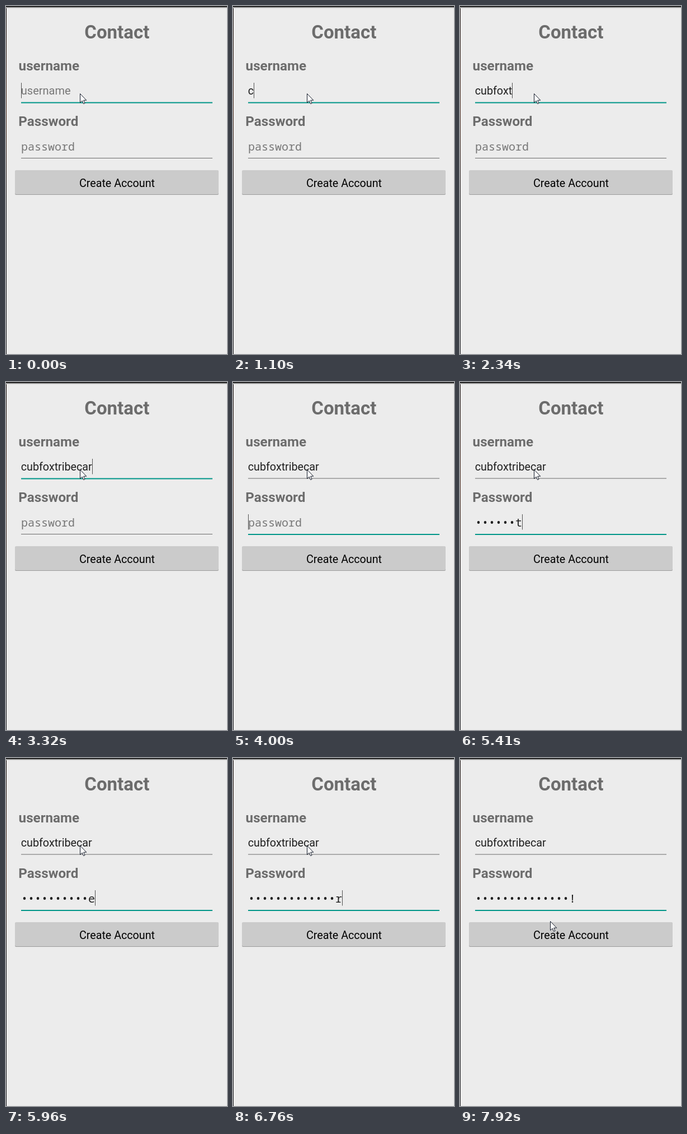
These frames come from a looping animation (395 px wide and 621 px high, 8000 ms). An HTML page:

```html
<!DOCTYPE html>
<html lang="en">
<head>
<meta charset="utf-8">
<title>Contact form</title>
<style>
html, body { margin: 0; width: 100%; height: 100%; overflow: hidden; background: #ececec; }
svg { display: block; width: 395px; height: 621px; font: 19.7px Roboto, sans-serif; }
.head { font-size: 33px; font-weight: 700; fill: #6c6c6c; }
.label { font-size: 24.2px; }
.value { fill: #1f1f1f; }
.secret { font: 20px "Noto Sans Mono", monospace; }
.hint { fill: #777; }
#user.hint { font-size: 20px; }
</style>
</head>
<body>
<svg viewBox="0 0 395 621">
  <defs>
    <linearGradient id="edge" x2="0" y2="1">
      <stop offset="0" stop-color="#140d0c"/>
      <stop offset=".3" stop-color="#4a2a1c"/>
      <stop offset=".58" stop-color="#17171a"/>
    </linearGradient>
    <linearGradient id="shade" x2="0" y2="1">
      <stop offset="0" stop-color="#333"/>
      <stop offset="1" stop-color="#ececec"/>
    </linearGradient>
  </defs>
  <rect width="395" height="621" fill="#ececec"/>
  <rect width="1" height="621" fill="url(#edge)"/>
  <rect width="395" height="1" fill="#000"/>
  <rect y="1" width="395" height="3" fill="url(#shade)"/>

  <text class="head" x="198.3" y="58" text-anchor="middle">Contact</text>
  <text class="head label" x="22.6" y="115">username</text>
  <text class="head label" x="22.3" y="214">Password</text>

  <rect id="userLine" x="27" y="171.5" width="342"/>
  <text id="user" x="26.8" y="158"></text>
  <rect id="passLine" x="27" y="271" width="342"/>
  <text id="pass" x="27" y="258"></text>
  <rect id="caret" width="1" height="27.5" fill="#1f1f1f" fill-opacity=".75"/>

  <rect x="16" y="294" width="364" height="43" rx="2" fill="#9c9c9c"/>
  <rect x="16" y="293" width="364" height="43" rx="2" fill="#cbcbcb"/>
  <text x="198.5" y="323" text-anchor="middle">Create Account</text>

  <path id="pointer" d="M0 0V16L3.7 12.6 6.1 18 8.5 17 6.2 11.7H11.2Z" fill="#fff" stroke="#111827"/>
</svg>
<script>
const LOOP = 8000;
const BLINK = 560;
const FOCUS = 3880;

const el = id => document.getElementById(id);
const clamp = v => Math.max(0, Math.min(1, v));
const mix = (a, b, k) => a + (b - a) * k;

function set(node, attrs) {
  for (const key in attrs) node.setAttribute(key, attrs[key]);
}

// Each burst types its keys evenly from the first moment to the last.
function plan(bursts) {
  return bursts.flatMap(([keys, from, to = from]) =>
    [...keys].map((key, i) => ({ key, at: mix(from, to, i / Math.max(1, keys.length - 1)) })));
}

const user = {
  text: el('user'), line: el('userLine'), caretY: 137, hint: 'username', style: '', wake: -420,
  keys: plan([['c', 1100], ['ub', 1400], ['fox', 1830, 2070], ['t', 2340],
    ['ribe', 2620, 2770], ['car', 3170, 3320]]),
  show: s => s
};
const pass = {
  text: el('pass'), line: el('passLine'), caretY: 236, hint: 'password', style: 'secret', wake: 4000,
  keys: plan([['cubfoxt', 4560, 5410], ['ribe', 5700, 5960], ['car', 6390, 6760], ['!', 7320]]),
  show: s => '•'.repeat(Math.max(0, s.length - 1)) + s.slice(-1)
};

function drawField(field, t, focused) {
  const typed = field.keys.filter(k => k.at <= t);
  const value = field.show(typed.map(k => k.key).join(''));
  field.text.textContent = value || field.hint;
  set(field.text, { class: `${field.style} ${value ? 'value' : 'hint'}` });
  set(field.line, focused ? { height: 2, fill: '#009688' } : { height: 1, fill: '#6c6c6c' });
  if (!focused) return;

  const width = value ? field.text.getComputedTextLength() : 0;
  const last = typed.length ? typed[typed.length - 1].at : field.wake;
  const lit = t < last || Math.floor((t - last) / BLINK) % 2 === 0;
  set(el('caret'), { x: Math.round(26.6 + width), y: field.caretY, opacity: lit ? 1 : 0 });
}

function draw(t) {
  drawField(user, t, t < FOCUS);
  drawField(pass, t, t >= FOCUS);

  // The pointer is seen only every 150 ms on its way to the button.
  const k = clamp(Math.floor((t - 7320) / 150) / 4);
  const ease = k * k * (3 - 2 * k);
  set(el('pointer'), { transform: `translate(${mix(132.5, 161.5, ease)} ${mix(156.5, 291.5, ease)})` });
}

const start = performance.now();
function tick() {
  draw((performance.now() - start) % LOOP);
  requestAnimationFrame(tick);
}
tick();
</script>
</body>
</html>
```
